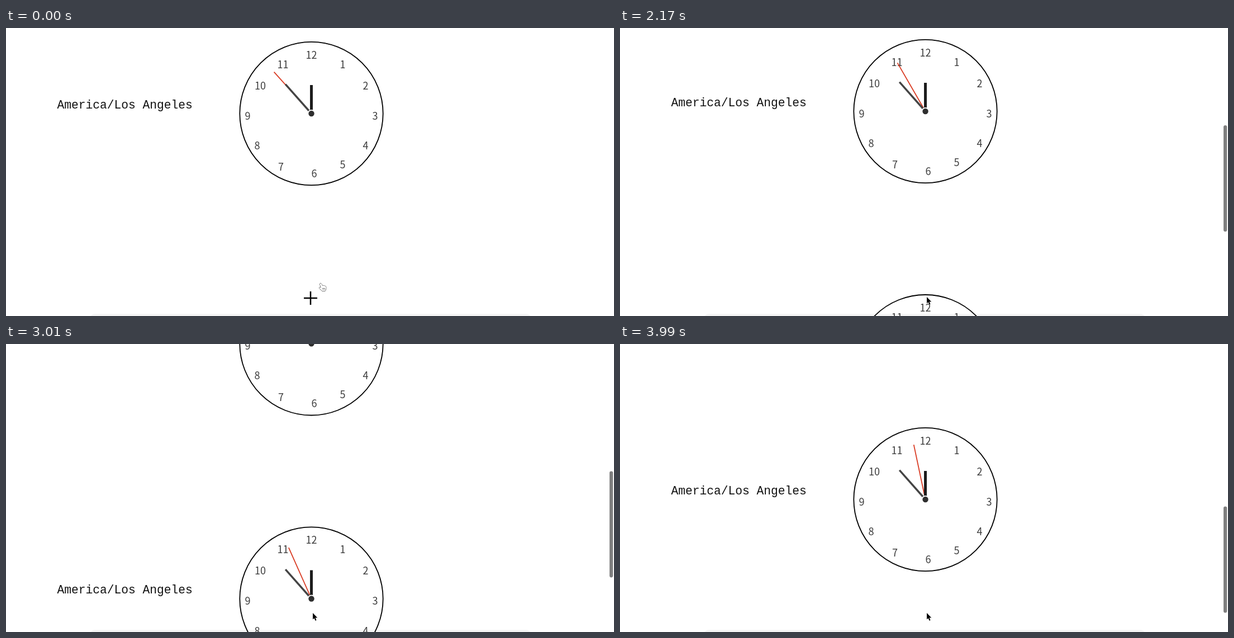
An HTML page with a canvas that plays this animation: 1088x515 px, repeating every 4410 ms.

```html
<!DOCTYPE html>
<html lang="en">
<head>
<meta charset="utf-8">
<title>World clocks</title>
<style>
html, body { margin: 0; width: 100%; height: 100%; overflow: hidden; background: #fff; }
canvas { display: block; }
</style>
</head>
<body>
<canvas id="stage" width="1088" height="515"></canvas>
<script>
const ctx = document.getElementById('stage').getContext('2d');
const W = 1088, H = 515, LOOP = 4410, STEP = 70;
const CX = 546.5, CY = 153, GAP = 456.2;

// Numeral centres relative to the dial centre, 1 to 12.
const NUMERALS = [
  [56, -88], [97, -50], [114, 4], [97, 57.5], [56, 91], [5, 107],
  [-54.5, 95.5], [-97, 57.5], [-114, 4], [-91.5, -50], [-51, -88], [0, -105]
];

const SCROLL = [
  [2100, 0], [2170, 4], [2380, 37.5], [3010, 153.7],
  [3290, 215.7], [3710, 304], [3850, 325], [3990, 331.2]
];

const clamp = x => Math.max(0, Math.min(1, x));
const ease = x => x * x * (3 - 2 * x);
const progress = (t, from, to) => ease(clamp((t - from) / (to - from)));

function slope(i) {
  const a = SCROLL[i - 1], b = SCROLL[i + 1];
  return a && b ? (b[1] - a[1]) / (b[0] - a[0]) : 0;
}

function scrollAt(t) {
  const last = SCROLL.length - 1;
  if (t <= SCROLL[0][0]) return 0;
  if (t >= SCROLL[last][0]) return SCROLL[last][1];
  const i = SCROLL.findIndex(p => p[0] > t) - 1;
  const [t0, y0] = SCROLL[i], [t1, y1] = SCROLL[i + 1];
  const d = t1 - t0, u = (t - t0) / d, v = 1 - u;
  return y0 * v * v * (1 + 2 * u) + y1 * u * u * (3 - 2 * u)
    + d * u * v * (v * slope(i) - u * slope(i + 1));
}

function secondsAt(t) {
  if (t < 280) return 53;
  if (t < 1260) return 54;
  if (t < 2450) return 55;
  return t < 3430 ? 56 : 58;
}

function line(x0, y0, x1, y1, width, color) {
  ctx.beginPath();
  ctx.moveTo(x0, y0);
  ctx.lineTo(x1, y1);
  ctx.lineWidth = width;
  ctx.strokeStyle = color;
  ctx.stroke();
}

function disc(x, y, r, color) {
  ctx.beginPath();
  ctx.arc(x, y, r, 0, Math.PI * 2);
  ctx.fillStyle = color;
  ctx.fill();
}

function pill(x, y, w, h, r, color) {
  ctx.beginPath();
  ctx.roundRect(x, y, w, h, r);
  ctx.fillStyle = color;
  ctx.fill();
}

function hand(degrees, length, width, color) {
  const a = degrees * Math.PI / 180;
  line(0, 0, length * Math.sin(a), -length * Math.cos(a), width, color);
}

function clock(y, seconds) {
  ctx.save();
  ctx.translate(CX, y);
  ctx.beginPath();
  ctx.arc(0, 0, 128.2, 0, Math.PI * 2);
  ctx.lineWidth = 1.8;
  ctx.strokeStyle = '#000';
  ctx.stroke();

  ctx.font = '500 18px "Noto Sans CJK JP", "Noto Sans CJK SC", "Noto Sans CJK", "Noto Sans", sans-serif';
  ctx.textAlign = 'center';
  ctx.fillStyle = '#3b3b3b';
  NUMERALS.forEach(([nx, ny], i) => ctx.fillText(i + 1, nx, ny + 6.7));

  hand(seconds * 6, 100, 1.8, '#d93a22');
  hand(-41.5, 70, 3.4, '#444');
  hand(0, 51, 5, '#1c1c1c');
  disc(0, 0, 7, '#fff');
  disc(0, 0, 5.2, '#2e2e2e');
  ctx.restore();

  ctx.font = '21.25px "Liberation Mono", "Courier New", monospace';
  ctx.textAlign = 'left';
  ctx.fillStyle = '#111';
  ctx.fillText('America/Los Angeles', 91.5, y - 9.5);
}

function plus(scale) {
  const r = 12 * scale, w = 2.5 * scale;
  line(545 - r, 483, 545 + r, 483, w, '#000');
  line(545, 483 - r, 545, 483 + r, w, '#000');
}

function outline(path, x, y, fill, stroke) {
  ctx.save();
  ctx.translate(x, y);
  ctx.lineJoin = 'round';
  ctx.lineWidth = 1;
  ctx.strokeStyle = stroke;
  ctx.stroke(path);
  ctx.fillStyle = fill;
  ctx.fill(path);
  ctx.restore();
}

const ARROW = new Path2D('M0 0V11.5L2.6 9.2L4.5 13.7L6.5 12.9L4.6 8.5H8.3Z');
const POINTER = new Path2D('M-.9 .4Q.4 -.7 1.5 .8L3.3 4.6Q4.8 3.4 5.6 4.6Q7 3.7 7.8 5Q9.3 4.6 9.7 6.2L9.8 9.6L8.3 13.6H2.6L-1.9 9.3Q-3.2 7.5 -1.6 6.9L.7 8.3L-1.3 1.9Q-1.5 .9 -.9 .4Z');

function pointer(x, y) {
  outline(POINTER, x, y, '#fff', '#111');
  for (let i = 0; i < 3; i++) {
    line(x + 3.6 + i * 1.8, y + 8.4, x + 3.9 + i * 1.8, y + 11.2, .7, '#333');
  }
}

function draw(t) {
  const scroll = scrollAt(t), seconds = secondsAt(t), added = t >= 1540;
  ctx.fillStyle = '#fff';
  ctx.fillRect(0, 0, W, H);
  pill(150, 511, 790, 24, 9, '#f5f5f5');

  clock(CY - scroll, seconds);
  if (added) {
    clock(CY + GAP - scroll, seconds);
    outline(ARROW, 549, 481, '#000', '#fff');
  } else {
    const hover = .42 * progress(t, 420, 910);
    const press = .9 * progress(t, 1330, 1540);
    plus(1 + hover + press);
    const p = progress(t, 0, 560);
    pointer(563 - 14 * p, 456.5 + 24.5 * p);
  }
  if (t >= 2170) pill(1080, 172.7 + .356 * scroll, 6.2, 190, 3.1, '#7f7f7f');
}

function frame(now) {
  const t = now % LOOP;
  draw(Math.floor(t / STEP + 1e-6) * STEP);
  requestAnimationFrame(frame);
}

draw(0);
requestAnimationFrame(frame);
</script>
</body>
</html>
```
